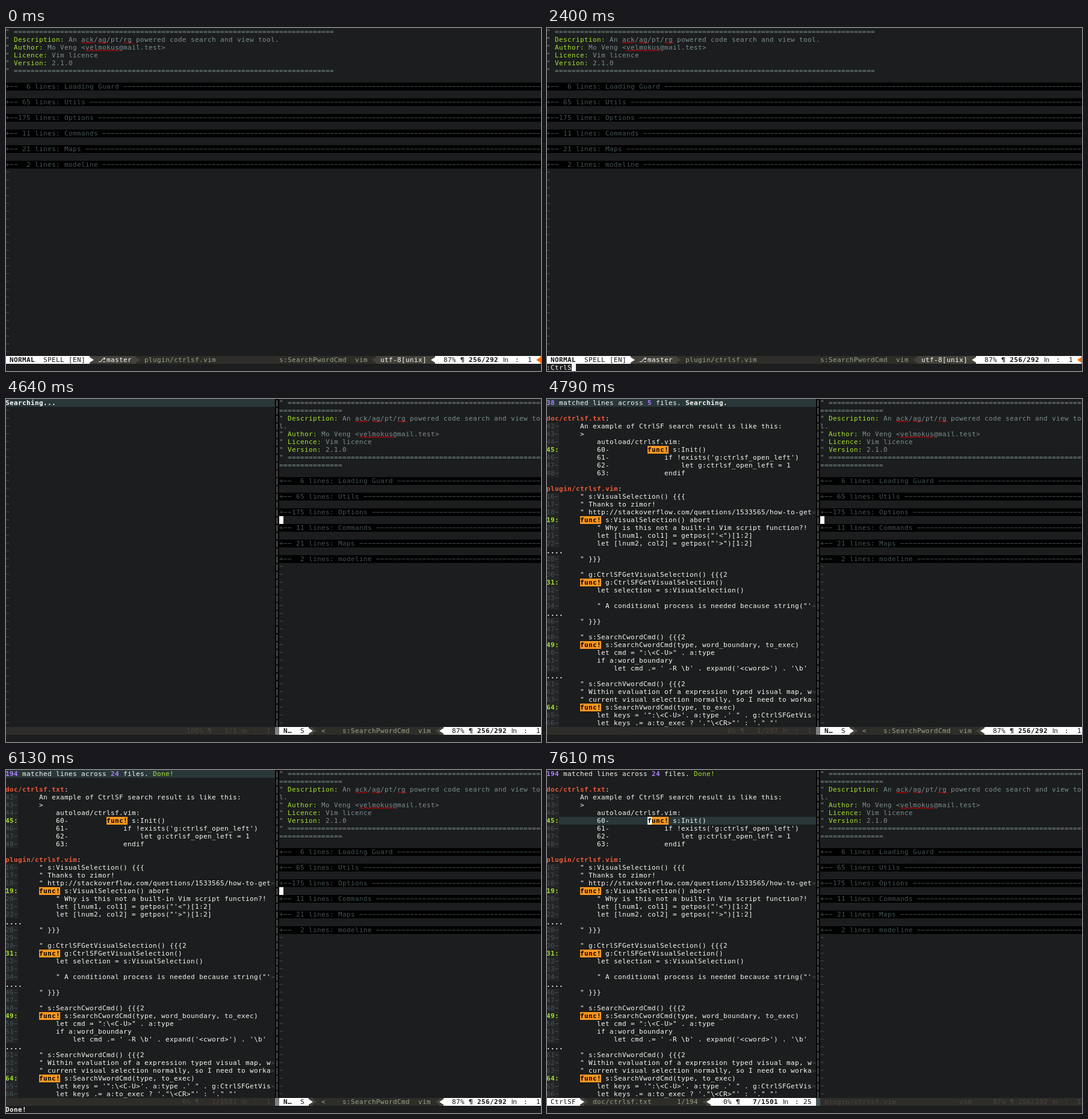
Write an HTML page that moves like this. It is 889 px wide and 571 px high and loops after 8000 ms.

```html
<!DOCTYPE html>
<html lang="en">
<head>
<meta charset="utf-8">
<title>Code search in Vim</title>
<style>
  html, body { margin: 0; width: 100%; height: 100%; overflow: hidden; background: #1b1d1e; }
  svg { display: block; width: 100%; height: 100%; }
  text { font: 11px "DejaVu Sans Mono", "DejaVu Sans", monospace; white-space: pre; }
  .b { font-weight: bold; }
  .ln { font: 11px "Liberation Sans", sans-serif; }
</style>
</head>
<body>
<svg id="screen" viewBox="0 0 889 571" xmlns="http://www.w3.org/2000/svg"></svg>
<script>
const LOOP = 8000, CW = 7, RH = 13, COLS = 128, STATUS = 42, CMD = 43, SPLIT = 64;
const C = {
  bg: '#1b1d1e', fg: '#f8f8f2', white: '#ffffff', ink: '#141413', comment: '#7e8e91',
  dim: '#465457', green: '#a6e22e', purple: '#ae81ff', title: '#ef5939', match: '#fd971f',
  line: '#293739', gutter: '#232526', bar: '#2e2d29', mid: '#45413b', sage: '#95a588',
  faint: '#4a463e', orange: '#ff6a00'
};

const RULE = '='.repeat(76);
const HEAD = [
  ['', RULE],
  ['Description:', 'An ack/ag/pt/rg powered code search and view tool.'],
  ['Author:', 'Mo Veng <velmokus@mail.test>'],
  ['Licence:', 'Vim licence'],
  ['Version:', '2.1.0'],
  ['', RULE]
];
const FOLDS = [[6, 'Loading Guard'], [65, 'Utils'], [175, 'Options'],
  [11, 'Commands'], [21, 'Maps'], [2, 'modeline']];

const RESULT = String.raw`
doc/ctrlsf.txt:
42-     An example of CtrlSF search result is like this:
43-     >
44-         autoload/ctrlsf.vim:
45:         60-         func! s:Init()
46-         61-             if !exists('g:ctrlsf_open_left')
47-         62-                 let g:ctrlsf_open_left = 1
48-         63:             endif

plugin/ctrlsf.vim:
16-     " s:VisualSelection() {{{
17-     " Thanks to zimor!
18-     " http://stackoverflow.com/questions/1533565/how-to-get»
19:     func! s:VisualSelection() abort
20-         " Why is this not a built-in Vim script function?!
21-         let [lnum1, col1] = getpos("'<")[1:2]
22-         let [lnum2, col2] = getpos("'>")[1:2]
....
28-     " }}}
29-
30-     " g:CtrlSFGetVisualSelection() {{{2
31:     func! g:CtrlSFGetVisualSelection()
32-         let selection = s:VisualSelection()
33-
34-         " A conditional process is needed because string("'»
....
46-     " }}}
47-
48-     " s:SearchCwordCmd() {{{2
49:     func! s:SearchCwordCmd(type, word_boundary, to_exec)
50-         let cmd = ":\<C-U>" . a:type
51-         if a:word_boundary
52-             let cmd .= ' -R \b' . expand('<cword>') . '\b'
....
61-     " s:SearchVwordCmd() {{{2
62-     " Within evaluation of a expression typed visual map, w»
63-     " current visual selection normally, so I need to worka»
64:     func! s:SearchVwordCmd(type, to_exec)
65-         let keys = '":\<C-U>'. a:type .' " . g:CtrlSFGetVis»
66-         let keys .= a:to_exec ? '."\<CR>"' : '." "'`.split('\n');

// Timelines: [start, value...]
const TYPED = [[0, 0], [750, 1], [1050, 2], [1800, 3], [1950, 5], [2400, 6], [2550, 7],
  [2850, 8], [3300, 9], [3450, 11], [3590, 12], [4040, 13]];
const BLINK = [[0, 0], [150, 1], [600, 0], [4640, 1], [5380, 0], [5680, 1], [5980, 0],
  [6130, 1], [6730, 0], [7020, 1]];
const PROGRESS = [
  [4790, 38, 5, 'Searching.', 297],
  [5090, 67, 9, 'Searching..', 527],
  [5380, 118, 14, 'Searching...', 912],
  [5680, 156, 19, 'Searching.', 1284],
  [6130, 194, 24, 'Done!', 1501]
];
const at = (steps, t) => steps.filter(s => s[0] <= t).pop();

// Grid drawing helpers
const px = col => col * CW - 1;
const esc = s => s.replace(/&/g, '&amp;').replace(/</g, '&lt;');
const box = (col, row, cols, fill) =>
  `<rect x="${px(col)}" y="${row * RH}" width="${cols * CW}" height="${RH}" fill="${fill}"/>`;
const put = (col, row, str, fill = C.fg, bold = false) => {
  if (!str.trim()) return '';
  const xs = Array.from(str, (_, i) => px(col + i)).join(' ');
  return `<text x="${xs}" y="${row * RH + 10}" fill="${fill}"${bold ? ' class="b"' : ''}>${esc(str)}</text>`;
};
const wave = (col, row, cols) =>
  `<path d="M${px(col)} ${row * RH + 11.5}${'q1 -1.8 2 0t2 0'.repeat(Math.round(cols * CW / 4))}" fill="none" stroke="#f00000"/>`;
const tri = (col, dir, fill) => {
  const x = px(col), y = STATUS * RH, [a, b] = dir > 0 ? [x, x + CW] : [x + CW, x];
  return `<path d="M${a} ${y + 2}L${b} ${y + 6.5}L${a} ${y + 11}Z" fill="${fill}"/>`;
};
const tildes = (col, from) => {
  let out = '';
  for (let r = from; r < STATUS; r++) out += put(col, r, '~', C.dim);
  return out;
};

function plugin(col, width) {
  let out = '', row = 0;
  for (const [label, rest] of HEAD) {
    const gap = label ? label.length + 1 : 0;
    const line = '" ' + ' '.repeat(gap) + rest;
    out += put(col + 2, row, label, C.green);
    for (const m of line.matchAll(/\b(ack|ag|rg|velmokus)\b/g))
      out += wave(col + m.index, row, m[0].length);
    for (let i = 0; i < line.length; i += width)
      out += put(col, row++, line.slice(i, i + width), C.comment);
  }
  for (const [count, name] of FOLDS) {
    row++;
    const text = `+−−${String(count).padStart(3)} lines: ${name} `;
    out += box(col, row, width, '#000') + put(col, row++, text.padEnd(width, '−'), C.dim);
  }
  return out + tildes(col, row);
}

function results(current) {
  let out = '';
  RESULT.forEach((line, i) => {
    const row = i + 1, num = /^\d\d[-:]/.test(line);
    if (row === current) out += box(0, row, SPLIT, C.line);
    if (!num) {
      const file = line.endsWith(':');
      out += put(0, row, file ? line.slice(0, -1) : line, file ? C.title : C.fg, true);
      if (file) out += put(line.length - 1, row, ':');
      return;
    }
    const hit = line[2] === ':';
    out += box(0, row, 3, C.gutter);
    out += put(0, row, line.slice(0, 3).replace('-', '−'), hit ? C.green : C.dim, hit);
    const more = line.endsWith('»');
    out += put(3, row, line.slice(3).replace('func!', '     ').replace('»', ''));
    if (more) out += put(SPLIT - 1, row, '»', C.dim);
    const f = line.indexOf('func!');
    if (f > 0) {
      out += box(f, row, 5, C.match);
      if (row === current) out += box(f, row, 1, C.white);
      out += put(f, row, 'func!', '#000', true);
    }
  });
  return out;
}

function summary([, lines, files, note], lit, cursor) {
  const a = String(lines), b = String(files), done = note === 'Done!';
  const mid = ' matched lines across ', end = ' files. ';
  let col = 0, out = lit ? box(0, 0, SPLIT, C.line) : '';
  const add = (s, fill, bold) => { out += put(col, 0, s, fill, bold); col += s.length; };
  add(a, C.purple, true);
  add(mid);
  add(b, C.purple, true);
  add(end);
  add(note, done ? C.green : C.fg, !done);
  return cursor ? out + box(0, 0, 1, C.white) + put(0, 0, a[0], '#000', true) : out;
}

// Status line: mode | branch > file ... type < encoding | position
const bar = (from, to, a, b, c, d) =>
  box(from, STATUS, to - from, C.bar) + box(from, STATUS, a - from, C.white) +
  box(a, STATUS, b - a, C.mid) + tri(a, 1, C.white) + tri(b, 1, C.mid) +
  box(c + 1, STATUS, d - c, C.mid) + tri(c, -1, C.mid) +
  box(d + 1, STATUS, to - d - 1, C.white) + tri(d, -1, C.white);

function place(ln, pct, line, total, col, active) {
  const fill = active ? C.ink : C.faint;
  const pos = `¶ ${String(line).padStart(3)}/${total}`, c = ln - 1 - pos.length;
  return put(c - 1 - pct.length, STATUS, pct, fill) + put(c, STATUS, pos, fill, active) +
    `<text class="ln" x="${px(ln) + 1}" y="${STATUS * RH + 10}" fill="${fill}">ln</text>` +
    put(ln + 3, STATUS, ':', fill) + put(ln + 7 - String(col).length, STATUS, String(col), fill);
}

function single(t) {
  const typed = at(TYPED, t)[1];
  const s = (col, str, fill, bold) => put(col, STATUS, str, fill, bold);
  let out = plugin(0, COLS) + bar(0, COLS, 20, 31, 87, 101);
  out += s(1, 'NORMAL', C.ink, true) + s(9, 'SPELL [EN]', C.ink) + s(22, '⎇', C.white) +
    s(24, 'master', C.white) + s(33, 'plugin/ctrlsf.vim', C.sage) +
    s(65, 's:SearchPwordCmd', C.sage) + s(83, 'vim', C.sage) + s(89, 'utf-8[unix]', C.white) +
    place(118, '87%', 256, 292, 1, true) + tri(126, -1, C.orange) + box(127, STATUS, 1, C.orange);
  if (typed) out += put(0, CMD, ':CtrlSF func!'.slice(0, typed)) + box(typed, CMD, 1, C.white);
  else if (at(BLINK, t)[1]) out += box(0, 12, 1, C.white);
  return out;
}

function split(t) {
  const s = (col, str, fill, bold) => put(col, STATUS, str, fill, bold);
  const found = at(PROGRESS, t), inLeft = t >= 7170, jumped = t >= 7610;
  let out = plugin(SPLIT + 1, 63);
  if (found) out += summary(found, !jumped, inLeft && !jumped) + results(jumped ? 6 : -1);
  else out += box(0, 0, SPLIT, C.line) + put(0, 0, 'Searching...', C.white, true) + tildes(0, 1);

  out += box(SPLIT, 0, 1, '#080808').replace(`height="${RH}"`, `height="${STATUS * RH}"`);
  for (let r = 0; r < STATUS; r++) out += put(SPLIT, r, '|', '#808080', true);
  out += box(SPLIT, STATUS, 1, inLeft ? '#455354' : '#808080');

  if (inLeft) {
    out += bar(0, SPLIT, 8, 9, 37, 38) + s(1, 'CtrlSF', C.ink);
    out += jumped
      ? s(11, 'doc/ctrlsf.txt', C.sage) + s(31, '1/194', C.sage) + place(56, '0%', 7, 1501, 25, true)
      : s(33, '194', C.sage) + place(56, '0%', 1, 1501, 1, true);
    out += box(SPLIT + 1, STATUS, 63, C.bar) + s(66, 'plugin/ctrlsf.vim', C.faint) +
      s(98, 'vim', C.faint) + place(120, '87%', 256, 292, 1, false);
  } else {
    out += box(0, STATUS, SPLIT, C.bar) +
      (found ? place(56, '0%', 1, found[4], 1, false) : place(56, '100%', 1, 1, 1, false));
    out += bar(SPLIT + 1, COLS, 72, 73, 102, 103) + s(66, 'N…', C.ink, true) + s(70, 'S', C.ink) +
      s(75, '<', C.sage) + s(80, 's:SearchPwordCmd', C.sage) + s(98, 'vim', C.sage) +
      place(120, '87%', 256, 292, 1, true);
    if (at(BLINK, t)[1]) out += box(SPLIT + 1, 15, 1, C.white);
  }
  if (t >= 5980 && !jumped) out += put(0, CMD, 'Done!', C.fg, true);
  return out;
}

const screen = document.getElementById('screen');
const start = performance.now();
let shown = '';
function frame() {
  const t = (performance.now() - start) % LOOP;
  const next = t < 4640 ? single(t) : split(t);
  if (next !== shown) screen.innerHTML = shown = next;
  requestAnimationFrame(frame);
}
frame();
</script>
</body>
</html>
```
